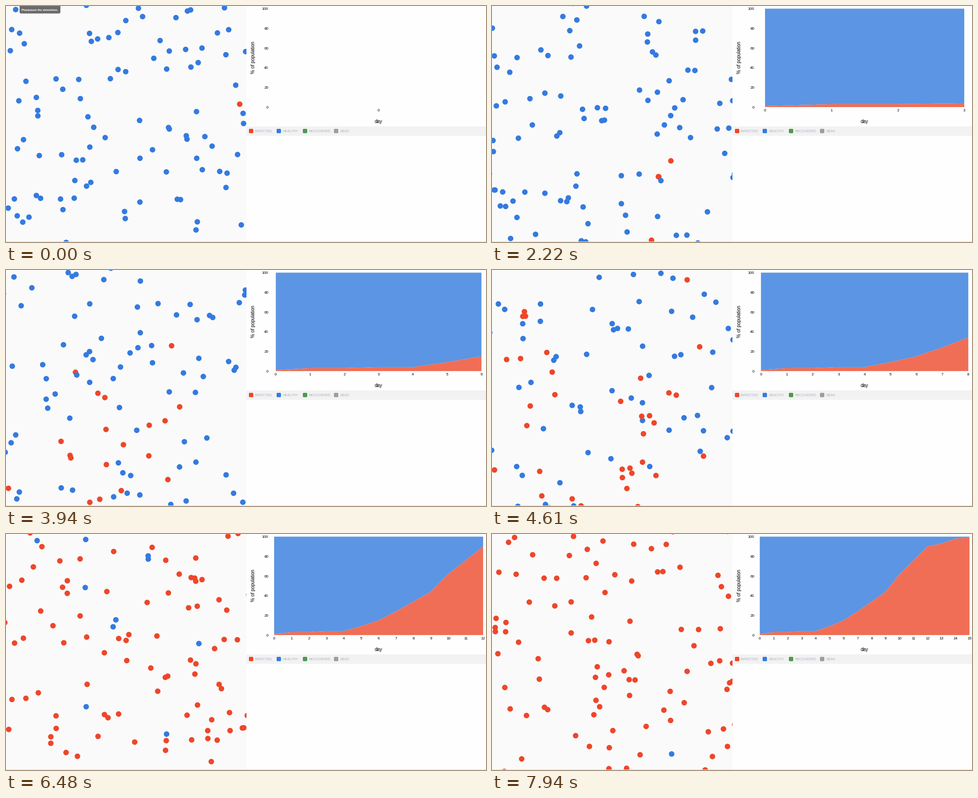
Animation of 988 by 488 pixels, one loop 8 s. Source, as a matplotlib script:

```python
import numpy as np
import matplotlib.pyplot as plt
from matplotlib.animation import FuncAnimation
from matplotlib.patches import FancyBboxPatch, Polygon, Rectangle

W, H, DPI = 988, 488, 100
FRAMES, INTERVAL = 160, 50
START, DAY = 740, 476            # ms
PX = 72 / DPI                    # points per pixel
PANEL = 495
LOW, HIGH = np.array([-8, -10]), np.array([503, 500])
CROWD = 100

RED, BLUE, GREEN, GREY = "#ee462a", "#347ae0", "#4c9a4c", "#9e9e9e"
CASES = [1, 3, 3, 4, 4, 9, 15, 24, 34, 44, 62, 76, 90, 93, 98, 99]

# first carriers: x, y, vx, vy (px, px/s)
CARRIERS = np.array([(481, 203, -77, 80), (488, 222, -109, 179),
                     (489, 243, -100, 75)], float)


def make_crowd():
    rng = np.random.default_rng(11)
    pos = rng.uniform(LOW, HIGH, (CROWD, 2))
    angle = rng.uniform(0, 2 * np.pi, CROWD)
    speed = rng.uniform(110, 216, CROWD)
    vel = speed[:, None] * np.column_stack([np.cos(angle), np.sin(angle)])
    n = len(CARRIERS)
    pos[:n], vel[:n] = CARRIERS[:, :2], CARRIERS[:, 2:]
    return pos, vel


POS, VEL = make_crowd()


def clock(frame):
    return (frame + 0.5) * INTERVAL


def place(frame):
    """Straight flight, folded back at the walls of the room."""
    t = max(0, clock(frame) - START - 20) / 1000
    span = HIGH - LOW
    u = (POS + VEL * t - LOW) % (2 * span)
    return LOW + span - np.abs(u - span)


def cases_at(frame):
    day = max(0, (clock(frame) - START) / DAY)
    return int(np.interp(day, range(len(CASES)), CASES))


def spread():
    """Frame at which each person falls ill: the closest contact goes next."""
    since = np.full(CROWD, FRAMES + 1)
    since[0] = 0
    queue = list(range(1, len(CARRIERS)))
    for f in range(FRAMES):
        pos = place(f)
        while np.sum(since <= f) < cases_at(f):
            sick = since <= f
            if queue:
                nxt = queue.pop(0)
            else:
                gap = np.linalg.norm(pos[:, None] - pos[None, sick], axis=2)
                gap = gap.min(axis=1)
                gap[sick] = np.inf
                nxt = int(gap.argmin())
            since[nxt] = f
    return since


SICK_SINCE = spread()

plt.rcParams["font.family"] = "Liberation Sans"
fig = plt.figure(figsize=(W / DPI, H / DPI), dpi=DPI, facecolor="#fefefe")
ax = fig.add_axes([0, 0, 1, 1])
ax.set(xlim=(0, W), ylim=(H, 0))
ax.axis("off")


def label(x, y, s, size=8, color="black", ha="center", **kw):
    kw.setdefault("va", "baseline")
    return ax.text(x, y, s, fontsize=size * PX, color=color, ha=ha, **kw)


def box(x, y, w, h, color, r=0, z=2):
    style = f"round,pad=0,rounding_size={r}"
    return ax.add_patch(FancyBboxPatch((x, y), w, h, boxstyle=style, fc=color,
                                       ec="none", zorder=z))


# simulation panel
room = ax.add_patch(Rectangle((0, 0), PANEL, H, fc="#fafafa", ec="none", zorder=0))
dots = ax.scatter(POS[:, 0], POS[:, 1], s=(11.4 * PX) ** 2, lw=0, zorder=3)
dots.set_clip_path(room)
ax.add_patch(Rectangle((0, 487), W, 1, fc="#dcdcdc", ec="none", zorder=4))
tip = box(28, -6, 84, 21.5, "#6b6b6b", 3, 5)
tip_text = label(70, 10, "Play/pause the simulation.", 6, "white",
                 weight="bold", zorder=6)

# chart
BASE, UNIT = 209, 2.035
for v in range(0, 101, 20):
    label(540, BASE - UNIT * v + 2.6, str(v), ha="right")
label(508.5, 106.5, "% of population", 9.8, rotation=90, va="center")
label(767, 242.5, "day", 10)
ticks = [label(767, 218, str(d)) for d in range(len(CASES))]
healthy, infected = [
    ax.add_patch(Polygon([(0, 0)] * 3, fc=c, ec="none", zorder=2))
    for c in ("#5c95e3", "#f06e56")]

# legend
box(PANEL, 249, W - PANEL, 19.5, "#f2f2f2", z=1)
for x, color, name in [(500, RED, "INFECTED"), (557, BLUE, "HEALTHY"),
                       (611, GREEN, "RECOVERED"), (675, GREY, "DEAD")]:
    box(x, 254, 9, 9, color, 2)
    label(x + 12.4, 261, name, 7, "#a9b3c4", "left")


def draw_chart(day):
    step = 437.4 / (day + 0.2)
    xs = 767 + step * (np.arange(day + 1) - day / 2)
    for d, tick in enumerate(ticks):
        tick.set_visible(d <= day)
        if d <= day:
            tick.set_x(xs[d])
    for area in (healthy, infected):
        area.set_visible(day > 0)
    edge = np.column_stack([xs, BASE - UNIT * np.array(CASES[:day + 1])])

    def close(y):
        return np.vstack([edge, (xs[-1], y), (xs[0], y)])

    healthy.set_xy(close(BASE - UNIT * 100))
    infected.set_xy(close(BASE))


def update(frame):
    t = clock(frame)
    dots.set_offsets(place(frame))
    dots.set_facecolors(np.where(SICK_SINCE <= frame, RED, BLUE))
    fade = float(np.clip(1 - (t - START) / 200, 0, 1))
    tip.set_alpha(fade)
    tip_text.set_alpha(fade)
    day = int(max(0, t - START) // DAY)
    draw_chart(min(day, len(CASES) - 1))
    return []


anim = FuncAnimation(fig, update, frames=FRAMES, interval=INTERVAL,
                     init_func=lambda: update(0), repeat=True,
                     repeat_delay=0, blit=False)
plt.show()
```
